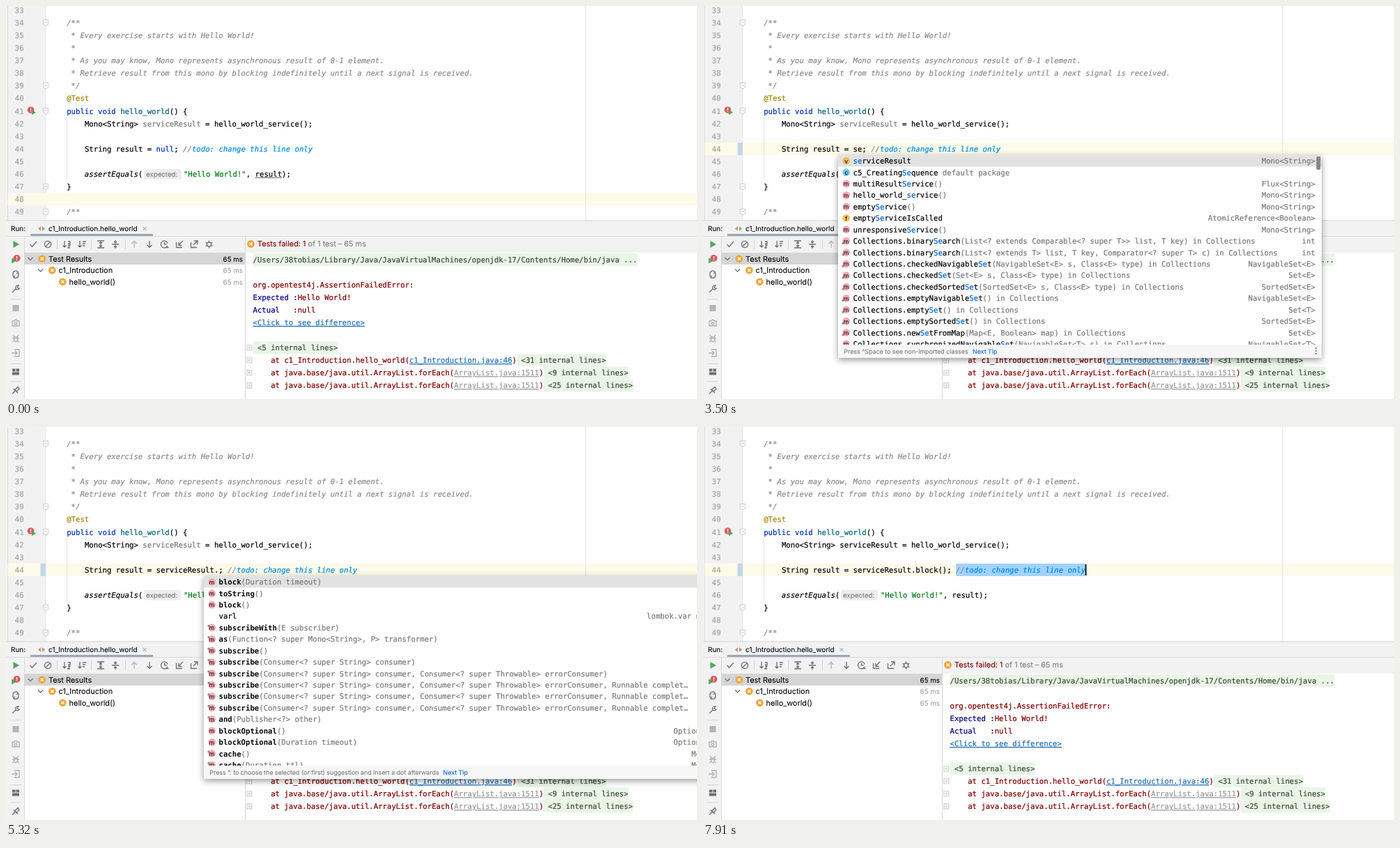
An HTML page that plays this animation: 992 px wide and 564 px high, repeating every 8000 ms.

```html
<!DOCTYPE html>
<html lang="en">
<head>
<meta charset="utf-8">
<title>Test run in an editor</title>
<style>
html, body { margin: 0; height: 100%; overflow: hidden; background: #fff; }
svg { display: block; width: 100vw; height: 100vh; }
text { --ink: #080808; white-space: pre; text-rendering: geometricPrecision; font: 10.66px "DejaVu Sans Mono", monospace; stroke-width: .22; }
text, tspan { fill: var(--ink); stroke: var(--ink); }
.ui { font-family: Inter, "Open Sans", sans-serif; stroke-width: .1; }
.c { --ink: #8c8c8c; font-style: italic; }
.t { --ink: #008dde; font-style: italic; }
.i { font-style: italic; }
.k { --ink: #0033b3; }
.a { --ink: #9e880d; }
.f { --ink: #00627a; }
.s { --ink: #067d17; }
.g { --ink: #7c7c7c; }
.n { --ink: #a4a4a4; }
.b { --ink: #0067d1; }
.B { font-weight: bold; stroke-width: 0; }
.e { --ink: #7f0000; }
.x { --ink: #000080; }
.l { --ink: #2470b3; text-decoration: underline; }
.u { --ink: #999; text-decoration: underline; }
.o { --ink: #414d41; }
.popup { filter: drop-shadow(0 3px 5px #0006); }
</style>
</head>
<body>
<svg id="stage" viewBox="0 0 992 564"></svg>
<script>
const CELL = 6.417, LEFT = 87.2, CODE = 112.9, OUT = 354.5;
const LOOP = 8000;
const lineY = n => 24 + (n - 34) * 18.1;
const outY = n => 364 + n * 18.05;
const col = n => CODE + n * CELL;

// ~k words~ marks words with class k
const mark = s => s.replace(/&/g, '&amp;').replace(/</g, '&lt;')
  .replace(/~(\w) (.*?)~/g, '<tspan class="$1">$2</tspan>');
const text = (x, y, s, attrs = '') => `<text x="${x}" y="${y + 3.8}" ${attrs}>${mark(s)}</text>`;
const ui = (x, y, s, size = 10.9, attrs = '') =>
  `<text class="ui" x="${x}" y="${y + 3.7}" style="font-size:${size}px" ${attrs}>${mark(s)}</text>`;
const rect = (x, y, w, h, fill, attrs = '') =>
  `<rect x="${x}" y="${y}" width="${w}" height="${h}" fill="${fill}" ${attrs}/>`;
const icon = (x, y, d, color = '#6e6e6e', fill = 'none') =>
  `<path transform="translate(${x} ${y})" d="${d}" stroke="${color}" stroke-width="1.3" fill="${fill}"/>`;
const disc = (x, y, r, fill) => `<circle cx="${x}" cy="${y}" r="${r}" fill="${fill}"/>`;
const play = (x, y, r) => icon(x, y, `M${-r * .7} ${-r}L${r} 0L${-r * .7} ${r}z`, 'none', '#4fa65b');
const fail = (x, y) => disc(x, y, 5.4, '#efa63a') + icon(x, y, 'M-2-2L2 2M2-2L-2 2', '#fff');
const alarm = (x, y, r) => disc(x, y, r, '#db5860') + icon(x, y, 'M0-3V.7M0 1.7V3', '#fff');

const code = [
  [34, 0, '~c /**~'],
  [35, 0, '~c  * Every exercise starts with Hello World!~'],
  [36, 0, '~c  *~'],
  [37, 0, '~c  * As you may know, Mono represents asynchronous result of 0-1 element.~'],
  [38, 0, '~c  * Retrieve result from this mono by blocking indefinitely until a next signal is received.~'],
  [39, 0, '~c  */~'],
  [40, 0, '~a @Test~'],
  [41, 0, '~k public void~ ~f hello_world~() {'],
  [46, 4, '~i assertEquals~('],
  [47, 0, '}'],
  [49, 0, '~c /**~']
];

function editor(s) {
  let out = rect(0, 0, 57, 308, '#f2f2f2') + rect(2, 0, .8, 308, '#d6d6d6') + rect(56.6, 0, .8, 308, '#e2e2e2');
  out += rect(2.5, lineY(s.row) - 9, 990, 18, '#fcfae9');
  out += rect(831.5, 0, 1, 308, '#e2e2e2') + rect(87, 160, .9, 90, '#dedede');
  for (let n = 33; n < 50; n++) out += text(12.8, lineY(n), '' + n, 'class="n"');
  for (const n of [34, 39, 41, 47, 49])
    out += icon(57, lineY(n), 'M-3.5-4H3.5V2L0 4.5L-3.5 2zM-2-.5H2', '#d6d6d6', '#fff');
  out += alarm(35.5, lineY(41) - 1.5, 4.8) + play(39.5, lineY(41) + 2, 3.6);
  for (const [n, indent, str] of code) out += text(LEFT + indent * CELL, lineY(n), str);
  out += text(CODE, lineY(42), `Mono<String> ${s.clean ? 'serviceResult' : '~g serviceResult~'} = hello_world_service();`);
  out += rect(198, 234, 53.5, 14.5, '#ededed', 'rx="3"') + ui(201, 240.8, '~g expected:~', 9.7);
  out += text(254.9, lineY(46), '~s "Hello World!"~, result);');
  if (!s.clean) out += rect(357.5, 246, 38.5, .9, '#555');

  const top = lineY(44) - 9;
  if (s.edited) out += rect(49.5, top, 7.5, 18, '#c3d6e8');
  if (s.brace) out += rect(col(35), top, CELL * 2, 18, '#90d0dc');
  if (s.sel) out += rect(col(s.sel[0]), top, (s.sel[1] - s.sel[0]) * CELL, 18, '#a2d2ff');
  out += text(CODE, lineY(44), `String result = ${s.expr}; ~c //~~t todo: change this line only~`);
  if (s.caret) out += rect(col(s.caret) - .5, top + 1, 1.7, 16, '#000');
  return out;
}

const toolbar = [
  [39, 'M-4.5 0L-1.5 3.5L5-4'],
  [60, 'M-4.7 0a4.7 4.7 0 1 0 9.4 0a4.7 4.7 0 1 0-9.4 0M3.3-3.3L-3.3 3.3'],
  [87, 'M-3-5V4M-5.5 1.5L-3 4L-.5 1.5M2-4H5V-1H2M2 1H5L2 5H5'],
  [109, 'M-3-5V4M-5.5 1.5L-3 4L-.5 1.5M1-4H6M1-1H5M1 2H4'],
  [136, 'M-5-5H5M-5 5H5M0-3.5V3.5M-2-1.5L0-3.5L2-1.5M-2 1.5L0 3.5L2 1.5'],
  [157, 'M-5 0H5M0-6V-2M-2-4L0-2L2-4M0 6V2M-2 4L0 2L2 4'],
  [184, 'M0 5V-4M-3.5-1L0-4.5L3.5-1', '#b5b5b5'],
  [206, 'M0-5V4M-3.5 1L0 4.5L3.5 1'],
  [227.5, 'M4.5 2A5 5 0 1 1 4.7-1.5M0-3V0H3M2 4.5H6'],
  [249, 'M5-5L-1 1M-1-3V1.5H3.5M-4.5-3V4.5H4'],
  [270, 'M-1 1L5-5M0-5H5V0M-4.5-3V4.5H4'],
  [291.5, 'M-3 0a3 3 0 1 0 6 0a3 3 0 1 0-6 0M0-5.5V-3M0 5.5V3M-5-2.7L-2.6-1.4M5 2.7L2.6 1.4M-5 2.7L-2.6 1.4M5-2.7L2.6-1.4']
];
const sidebar = [
  [385, 'M-4 3V-1A4 4 0 0 1 3-3.5M1-5L3.5-3L1-1M4-2V1A4 4 0 0 1-3 4M-1 2L-3.5 4L-1 6'],
  [406, 'M-5 5L0 0M0 0A3.5 3.5 0 0 1 4-5L2-2L5-.5A3.5 3.5 0 0 1 0 0'],
  [455, 'M-5-3H-2L-1-4.5H1L2-3H5V4H-5zM-1.8.5a1.8 1.8 0 1 0 3.6 0a1.8 1.8 0 1 0-3.6 0', '#b0b0b0'],
  [477, 'M-2.5-2H2.5V3L0 5L-2.5 3zM-5 0H5M-4-5L-2-2M4-5L2-2M-5 5L-2 3M5 5L2 3', '#b0b0b0'],
  [498, 'M-2-5H5V5H-2M-6 0H2M-1-3L2 0L-1 3', '#b0b0b0'],
  [551.5, 'M-5 5L-1 1M-3-2L3 4M-1-1L3-5L5-2L1 2z']
];

const stack = (name, link, n) => `    ~e at ${name}(~${link}~e )~~o  <${n} internal lines>~`;
const output = [
  [0, '~o /Users/38tobias/Library/Java/JavaVirtualMachines/openjdk-17/Contents/Home/bin/java ...~', 0, 86],
  [2, '~e org.opentest4j.AssertionFailedError:~'],
  [3, '~x Expected :~~e Hello World!~'],
  [4, '~x Actual   :~~e null~'],
  [5, '~l <Click to see difference>~'],
  [7, '~o  <5 internal lines>~', 0, 19],
  [8, stack('c1_Introduction.hello_world', '~l c1_Introduction.java:46~', 31), 59, 20],
  [9, stack('java.base/java.util.ArrayList.forEach', '~u ArrayList.java:1511~', 9), 65, 19],
  [10, stack('java.base/java.util.ArrayList.forEach', '~u ArrayList.java:1511~', 25), 65, 20]
];

function runPanel() {
  let out = rect(0, 307.5, 992, 257, '#f2f2f2') + rect(0, 307.5, 992, .9, '#cfcfcf') + rect(0, 330, 992, .8, '#d6d6d6');
  out += rect(26, 354, 966, 210, '#fff') + rect(26, 331, .8, 233, '#d4d4d4');
  out += rect(26, 354, 317, 17, '#d5d5d5') + rect(343, 331, .9, 233, '#d1d1d1');
  out += ui(7, 319.5, 'Run:', 10) + ui(61, 319.5, 'c1_Introduction.hello_world', 10);
  out += rect(35, 327, 176, 3, '#9ca8b8');
  out += icon(51, 319.5, 'M-1-3.5V3.5L-5 0z', 'none', '#e5866f') + icon(51, 319.5, 'M1-3.5V3.5L5 0z', 'none', '#72b57c');
  out += icon(199, 319.5, 'M-2.5-2.5L2.5 2.5M2.5-2.5L-2.5 2.5', '#bbb');
  for (const [x, d, color] of toolbar) out += icon(x, 342, d, color);
  for (const x of [73, 122, 171]) out += rect(x, 335, .9, 14, '#cfcfcf');
  out += play(14, 342, 5) + alarm(15.5, 362, 5) + play(11, 365.5, 4);
  for (const [y, d, color] of sidebar) out += icon(14, y, d, color);
  out += rect(9.5, 429, 9, 9, '#b5b5b5');
  for (const [x, y, w] of [[9, 520.5, 4.5], [14.5, 520.5, 4.5], [9, 525.5, 10]]) out += rect(x, y, w, 4, '#6e6e6e');
  for (const y of [420.5, 513, 538.5]) out += rect(6, y, 16, .9, '#cfcfcf');

  out += fail(351.5, 341.5) + ui(361, 341.5, '~e Tests failed: 1~~g  of 1 test – 65 ms~');
  [['Test Results', 0], ['c1_Introduction', 14.6], ['hello_world()', 29.6]].forEach(([name, dx], i) => {
    const y = 362.8 + i * 16.5;
    if (i < 2) out += icon(35 + dx, y, 'M-3.5-1.8L0 1.8L3.5-1.8');
    out += fail(51.8 + dx, y) + ui(61 + dx, y, name);
    out += ui(340, y, i ? '~n 65 ms~' : '65 ms', 9.8, 'text-anchor="end"');
  });

  for (const [n, str, from, len] of output) {
    if (len) out += rect(OUT + from * CELL, outY(n) - 9, len * CELL, 18, '#e9f5e6');
    out += text(OUT, outY(n), str);
    if (n > 6) out += icon(349.3, outY(n), 'M-3.5-3.5H3.5V3.5H-3.5zM-2 0H2M0-2V2', '#d4d4d4');
  }
  return out;
}

const fromCollections = (name, args, type) => ['m', `Collections.${name}~g (${args}) in Collections~`, type, 3];
const method = (name, args, type, pin) => ['m', `~B ${name}~~g (${args}${args.endsWith('…') ? '' : ')'}~`, type, pin];
const string = 'Mono<String>', consumer = 'Consumer<? super String> consumer';
const onError = consumer + ', Consumer<? super Throwable> errorConsumer', onDone = onError + ', Runnable complet…';

const lists = {
  names: {
    x: 194, width: 694, right: 879, tip: 'Press ^Space to see non-imported classes', next: 387,
    rows: [
      ['v', '~b se~rviceResult', string],
      ['c', 'c5_Creating~b Se~quence~g  default package~'],
      ['m', 'multiResult~b Se~rvice~g ()~', 'Flux<String>'],
      ['m', 'hello_world_~b se~rvice~g ()~', string],
      ['m', 'empty~b Se~rvice~g ()~', string],
      ['f', 'empty~b Se~rviceIsCalled', 'AtomicReference<Boolean>'],
      ['m', 'unresponsive~b Se~rvice~g ()~', string],
      fromCollections('binary~b Se~arch', 'List<? extends Comparable<? super T>> list, T key', 'int'),
      fromCollections('binary~b Se~arch', 'List<? extends T> list, T key, Comparator<? super T> c', 'int'),
      fromCollections('checkedNavigable~b Se~t', 'NavigableSet<E> s, Class<E> type', 'NavigableSet<E>'),
      fromCollections('checked~b Se~t', 'Set<E> s, Class<E> type', 'Set<E>'),
      fromCollections('checkedSorted~b Se~t', 'SortedSet<E> s, Class<E> type', 'SortedSet<E>'),
      fromCollections('emptyNavigable~b Se~t', '', 'NavigableSet<E>'),
      fromCollections('empty~b Se~t', '', 'Set<T>'),
      fromCollections('emptySorted~b Se~t', '', 'SortedSet<E>'),
      fromCollections('new~b Se~tFromMap', 'Map<E, Boolean> map', 'Set<E>'),
      fromCollections('synchronizedNavigable~b Se~t', 'NavigableSet<T> s', 'NavigableSet<T>')
    ]
  },
  methods: {
    x: 284, width: 787, right: 1061, next: 627.5,
    tip: 'Press ^. to choose the selected (or first) suggestion and insert a dot afterwards',
    rows: [
      method('block', 'Duration timeout'),
      method('toString', ''),
      method('block', ''),
      ['', 'varl', 'lombok.var name = expr'],
      method('subscribeWith', 'E subscriber', '', -3),
      method('as', 'Function<? super Mono<String>, P> transformer', '', -3),
      method('subscribe', '', '', -3),
      method('subscribe', consumer, '', -3),
      method('subscribe', onError, '', -3),
      method('subscribe', onDone, '', -3),
      method('subscribe', onDone, '', -3),
      method('subscribe', onDone, '', -3),
      method('and', 'Publisher<?> other', '', -3),
      method('blockOptional', '', 'Optional<String>'),
      method('blockOptional', 'Duration timeout', 'Optional<String>'),
      method('cache', '', string, -3),
      method('cache', 'Duration ttl', string, -3)
    ]
  }
};
const badge = { m: '#f5a9b3', c: '#7cc4e8', v: '#f2bd5c', f: '#f2bd5c' };

function popup({ x, width, right, rows, tip, next }, picked) {
  let out = rect(x, 214, width, 291, '#fff');
  out += rect(x, 214 + picked * 16.43, width, 16.5, '#e2e2e2');
  rows.forEach(([kind, label, type, pin], i) => {
    const y = 222.3 + i * 16.43;
    if (kind) out += disc(x + 11.6, y, 5.4, badge[kind]) + ui(x + 11.6, y - .4, kind, 8.5, 'text-anchor="middle"');
    if (pin) out += rect(x + 5.5, y + pin - 1.2, 3, 3, '#8c8c8c', 'rx="1"');
    out += text(x + 21.5, y, label);
    if (type) out += text(right, y, `~g ${type}~`, 'text-anchor="end"');
  });
  out += rect(x, 486, width, 19, '#f7f7f7');
  out += ui(x + 8.3, 495, `~g ${tip}~`, 8.87) + ui(next, 495, '~b Next Tip~', 8.87);
  const edge = x + width;
  out += rect(edge - 7.5, 216, 6, 19, '#858585', 'rx="2"');
  for (const dy of [-4, 0, 4]) out += disc(edge - 8, 495 + dy, 1.1, '#6e6e6e');
  return `<g class="popup">${out}</g>`;
}

// each step keeps what came before it
const steps = [
  [0, { row: 48, expr: '~k null~' }],
  [1610, { row: 44, caret: 17 }],
  [1820, { sel: [16, 20], caret: 20 }],
  [2310, { caret: 0 }],
  [2590, { caret: 20 }],
  [2730, { expr: 's', sel: null, caret: 17, edited: true }],
  [2870, { expr: 'se', caret: 18 }],
  [3430, { caret: 0, list: 'names', picked: 0 }],
  [4060, { list: '', expr: 'serviceResult', caret: 29 }],
  [4410, { expr: 'serviceResult.', caret: 30 }],
  [4480, { list: 'methods' }],
  [5320, { caret: 0 }],
  [5880, { caret: 30 }],
  [6020, { picked: 1 }],
  [6090, { picked: 2 }],
  [6230, { list: '', expr: 'serviceResult.block()', caret: 37, brace: true }],
  [7000, { caret: 0, clean: true }],
  [7560, { brace: false, sel: [39, 52], caret: 52 }],
  [7630, { sel: [39, 67], caret: 67 }],
  [7770, { sel: [39, 68], caret: 68 }]
];

const stage = document.getElementById('stage'), panel = runPanel();
let shown = 0;

function frame(now) {
  const t = now % LOOP, past = steps.filter(([at]) => at <= t);
  if (past.length !== shown) {
    shown = past.length;
    const s = Object.assign({}, ...past.map(step => step[1]));
    stage.innerHTML = editor(s) + panel + (s.list ? popup(lists[s.list], s.picked) : '');
  }
  requestAnimationFrame(frame);
}
frame(0);
</script>
</body>
</html>
```
